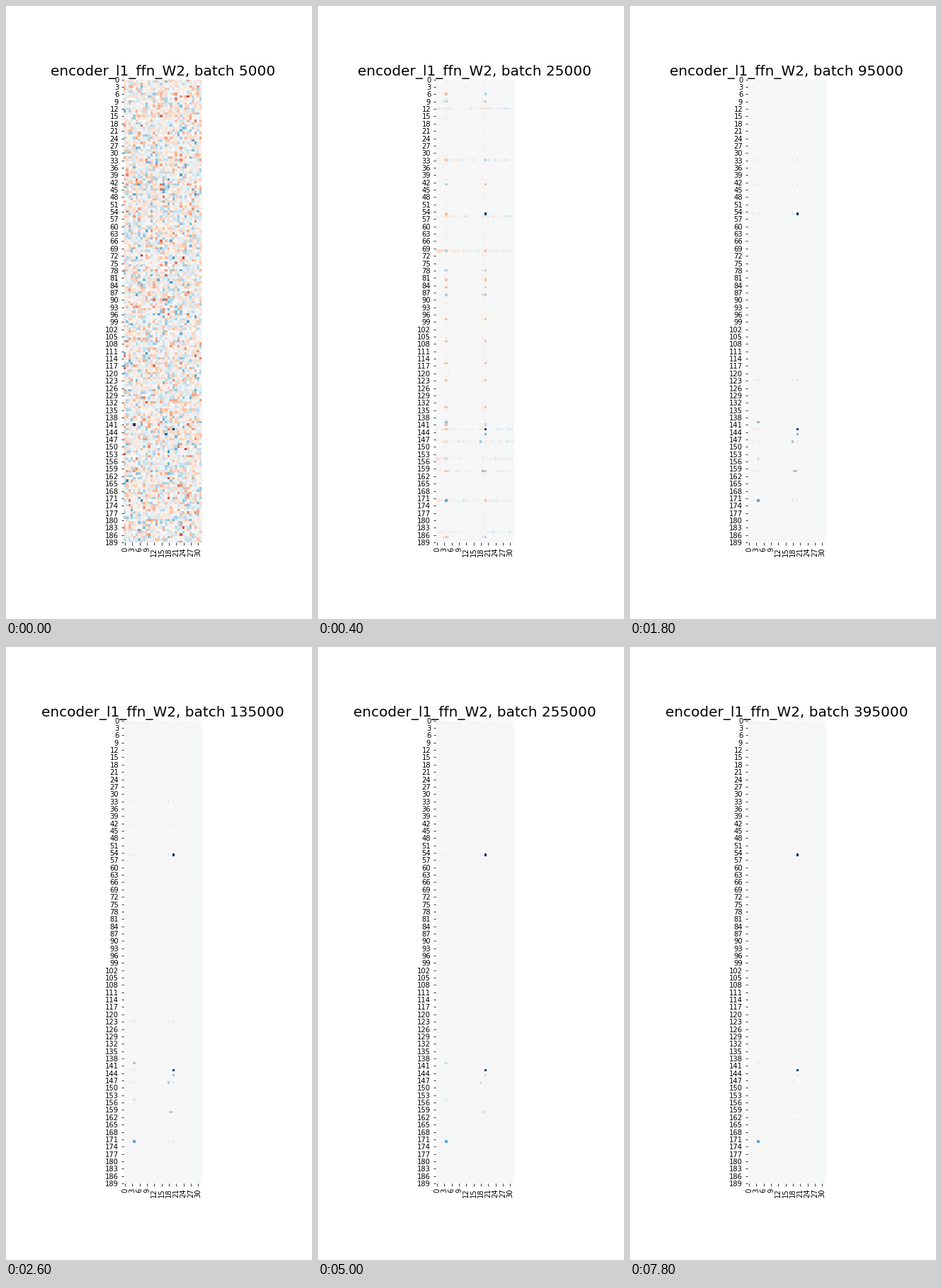
A matplotlib script that plays this animation: 432 by 864 pixels, repeating every 8 s.

```python
import numpy as np
import matplotlib.pyplot as plt
from matplotlib.animation import FuncAnimation

ROWS, COLS = 190, 32
FRAMES, INTERVAL = 40, 200
SPARSE_AT, SETTLED_AT, FROZEN_AT = 2, 9, 36

# Rows that stay active across all columns, and rows with a few active cells
BANDS = [12, 33, 56, 70, 143, 148, 155, 160, 172, 185]
HOT_ROWS = [6, 9, 33, 43, 55, 70, 78, 82, 85, 88, 98, 107, 116, 123, 134,
            141, 143, 160, 172, 187]
HUB_ROWS = [33, 43, 55, 123, 143, 148, 160, 172]
HUB_COLS = [2, 4, 18, 20]
PAIR_COLS = [4, 20]

# The few strong weights that remain
STRONG = {(55, 20): 1, (143, 20): .96, (172, 4): .52, (145, 20): .45,
          (140, 4): .42, (160, 19): .4, (148, 18): .38, (155, 4): .22}

rng = np.random.default_rng(7)


def dense_weights():
    grid = np.clip(rng.normal(0, .2, (ROWS, COLS)), -.8, .8)
    grid[141, 4] = grid[143, 20] = 1
    return grid


def sparse_weights():
    cols = np.arange(COLS)
    hubs = np.exp(-((cols - 4) / 1.2) ** 2) + np.exp(-((cols - 19.5) / 1.3) ** 2)
    grid = rng.normal(0, .025, (ROWS, COLS)) * hubs
    grid[HOT_ROWS] += rng.normal(0, .1, (len(HOT_ROWS), COLS)) * hubs
    # Band rows lean to red on the left and blue on the right
    lean = np.linspace(-.06, .06, COLS)
    grid[BANDS] += lean + rng.normal(0, .07, (len(BANDS), COLS))
    signs = rng.choice([-1, 1], (len(HOT_ROWS), 2), p=[.6, .4])
    grid[np.ix_(HOT_ROWS, PAIR_COLS)] = .3 * signs
    return with_strong(grid)


def lasting_weights():
    grid = np.zeros((ROWS, COLS))
    shape = len(HUB_ROWS), len(HUB_COLS)
    grid[np.ix_(HUB_ROWS, HUB_COLS)] = (
        rng.choice([-1, 1], shape) * rng.uniform(.03, .14, shape))
    return with_strong(grid)


def with_strong(grid):
    for cell, value in STRONG.items():
        grid[cell] = value
    return grid


DENSE, SPARSE, LASTING = dense_weights(), sparse_weights(), lasting_weights()


def shrink(grid, k):
    """Decay all but the strongest weights towards zero."""
    age = np.clip(k, SETTLED_AT, FROZEN_AT) - SETTLED_AT
    size = np.abs(grid)
    faded = np.maximum(size * np.exp(-age / 30) - .002 * age, 0)
    return np.where(size > .5, grid, np.sign(grid) * faded)


def weights(k):
    if k < SPARSE_AT:
        mix = (1, .3)[k]
        return mix * DENSE + (1 - mix) * SPARSE
    fade = np.exp((SPARSE_AT - k) / 1.8)
    return fade * SPARSE + (1 - fade) * shrink(LASTING, k)


fig, ax = plt.subplots(figsize=(6, 12), dpi=72, facecolor="white")
fig.subplots_adjust(left=.125, right=.9, bottom=.125, top=.88)
ax.set_facecolor("#f5f6f6")

# Half a pixel up and left, so that cell edges round down
cell_px = 864 * (.88 - .125) / (ROWS - 1)
nudge = .5 / cell_px
mesh = ax.pcolormesh(np.arange(COLS + 1) - nudge, np.arange(ROWS + 1) - nudge,
                     DENSE, cmap="RdBu", vmin=-1, vmax=1, linewidth=0)
ax.set(xlim=(0, COLS), ylim=(ROWS - .5, .5), aspect="equal")
for spine in ax.spines.values():
    spine.set_visible(False)

x_ids, y_ids = np.arange(0, COLS, 3), np.arange(0, ROWS, 3)
ax.set_xticks(x_ids + .5, x_ids, rotation=90)
ax.set_yticks(y_ids + .5, y_ids)
title = ax.set_title("", fontsize=20)


def update(k):
    mesh.set_array(weights(k))
    title.set_text(f"encoder_l1_ffn_W2, batch {5000 + 10000 * k}")
    return mesh, title


anim = FuncAnimation(fig, update, frames=FRAMES, interval=INTERVAL,
                     repeat=True, repeat_delay=0)
plt.show()
```
